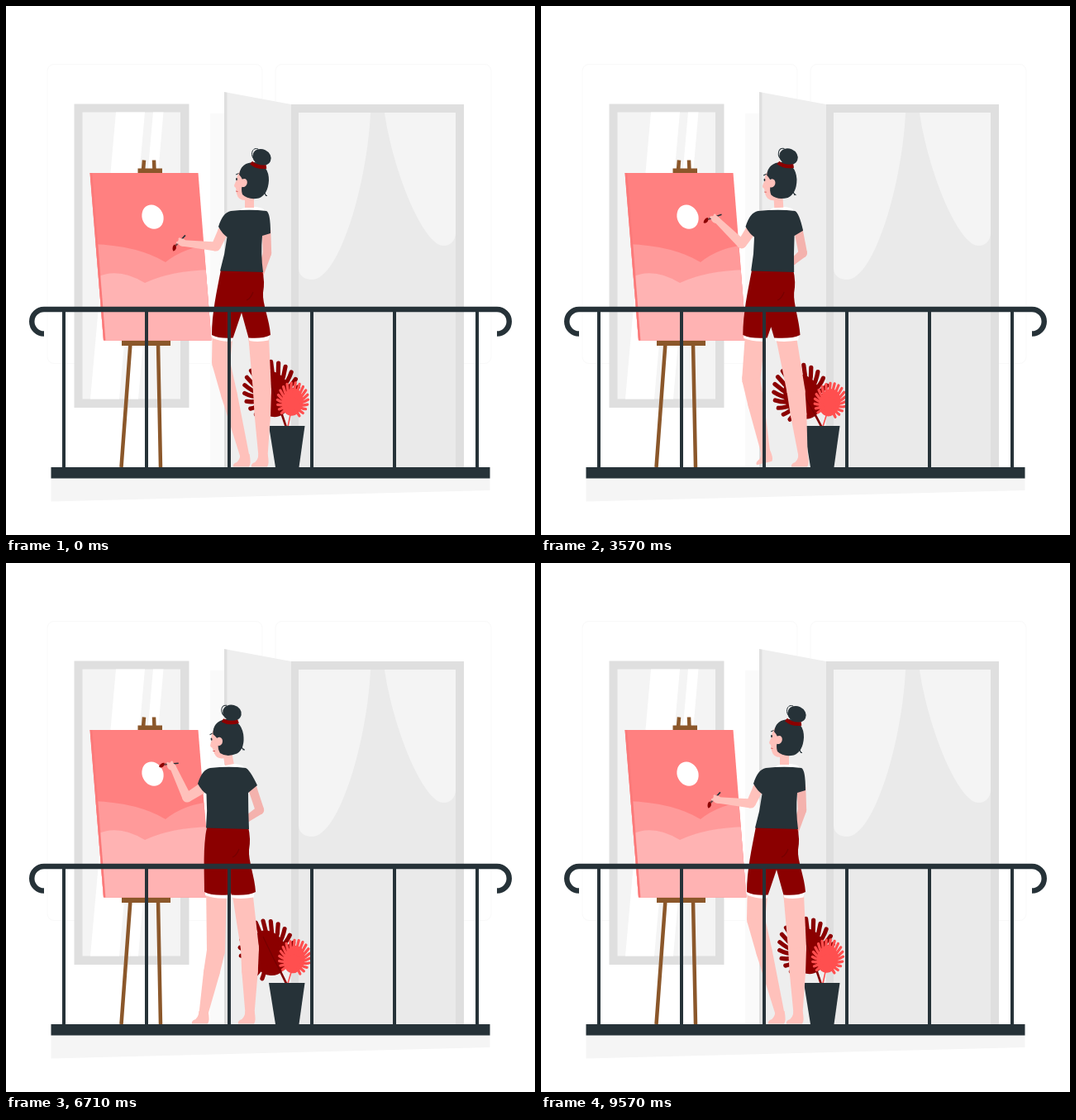
An HTML page with a canvas that plays this animation: 640 by 640 pixels, repeating every 9.64 s.

```html
<!DOCTYPE html>
<html lang="en">
<head>
<meta charset="utf-8">
<title>Painting on the balcony</title>
<style>
  html, body { margin: 0; width: 100%; height: 100%; overflow: hidden; background: #fff; }
  canvas { display: block; width: 640px; height: 640px; }
</style>
</head>
<body>
<canvas id="stage" width="640" height="640"></canvas>
<script>
const ctx = document.getElementById('stage').getContext('2d');
const LOOP = 9640, FPS = 14;
const INK = '#263238', RED = '#8b0000', CORAL = '#ff4f4f', SKIN = '#ffc1bb',
      SHADE = '#f4b2ad', WOOD = '#8b572a', FRAME = '#dfdfdf', PALE = '#f5f5f5';

// Which pose column is reached at which time.
const TIMES = [0, 1000, 2000, 2860, 4210, 5000, 6710, 8070, 9570];
const ORDER = [0, 1, 1, 2, 3, 4, 4, 5, 0];
const TRACKS = {
  neck:   [295, 293, 293.5, 280, 270.5, 283],
  tilt:   [0, -7, -6, -1, -11, -9],
  turn:   [1, 1, 1, 0, 0, 0],
  front:  [268, 268, 266, 250, 243, 255],
  back:   [310, 311, 311, 300, 293, 305],
  waist:  [285, 285, 285, 273.5, 268, 278],
  hemL:   [249, 245, 245, 243, 240, 248],
  hemR:   [320, 320, 320.5, 305.5, 302, 311],
  forkX:  [285, 283, 283, 273, 271, 280],
  forkY:  [371, 378, 378, 397, 396, 397],
  kneeL:  [260, 252, 252, 256, 254, 261],
  ankleL: [289, 319, 316, 236, 239, 242],
  lift:   [0, -45, -35, 0, 0, 0],
  kneeR:  [310, 308, 312, 303, 295, 305],
  ankleR: [311, 310, 315, 318, 295, 313],
  elbowX: [254, 247, 251, 231, 219, 237],
  elbowY: [291, 300, 289, 287, 284, 287],
  handX:  [213, 216, 211, 211, 200, 212],
  handY:  [286, 307, 275, 249, 246, 254],
  brush:  [-47, -74, -40, -8, -5, -4],
  wrist:  [324, 315, 309, 310, 310, 317]
};

const rad = deg => deg * Math.PI / 180;

// Monotone cubic interpolation: smooth, without overshoot.
function sample(track, t) {
  const v = i => track[ORDER[i]];
  const last = TIMES.length - 1;
  if (t >= TIMES[last]) return v(last);
  let i = 0;
  while (t >= TIMES[i + 1]) i++;
  const rate = k => (v(k + 1) - v(k)) / (TIMES[k + 1] - TIMES[k]);
  const slope = k => {
    if (k === 0 || k === last) return 0;
    const a = rate(k - 1), b = rate(k);
    return a * b <= 0 ? 0 : 2 * a * b / (a + b);
  };
  const h = TIMES[i + 1] - TIMES[i], u = (t - TIMES[i]) / h, w = 1 - u;
  return v(i) * (1 + 2 * u) * w * w + slope(i) * h * u * w * w
       + v(i + 1) * u * u * (3 - 2 * u) - slope(i + 1) * h * u * u * w;
}

function poseAt(t) {
  const p = {};
  for (const name in TRACKS) p[name] = sample(TRACKS[name], t);
  const u = Math.min(1, Math.max(0, (t - 4210) / 2500));
  p.handX += 3.5 * Math.sin(Math.PI * u);
  return p;
}

function shape(d, fill) {
  ctx.fillStyle = fill;
  ctx.fill(new Path2D(d));
}
function line(d, color, width, cap = 'butt') {
  ctx.strokeStyle = color;
  ctx.lineWidth = width;
  ctx.lineCap = cap;
  ctx.stroke(new Path2D(d));
}
function box(x, y, x2, y2, fill) {
  ctx.fillStyle = fill;
  ctx.fillRect(x, y, x2 - x, y2 - y);
}
function oval(x, y, rx, ry, angle, fill) {
  ctx.fillStyle = fill;
  ctx.beginPath();
  ctx.ellipse(x, y, rx, ry, rad(angle), 0, 2 * Math.PI);
  ctx.fill();
}
function placed(x, y, angle, draw) {
  ctx.save();
  ctx.translate(x, y);
  ctx.rotate(rad(angle));
  draw();
  ctx.restore();
}

// Chain of tapered round segments through [x, y, radius].
function limb(joints, fill) {
  joints.forEach(([x, y, r], i) => {
    oval(x, y, r, r, 0, fill);
    if (!i) return;
    const [px, py, pr] = joints[i - 1];
    const len = Math.hypot(x - px, y - py) || 1;
    const nx = (py - y) / len, ny = (x - px) / len;
    shape(`M${px + nx * pr},${py + ny * pr}L${x + nx * r},${y + ny * r}
      L${x - nx * r},${y - ny * r}L${px - nx * pr},${py - ny * pr}Z`, fill);
  });
}

function drawHouse() {
  box(0, 0, 640, 640, '#fff');
  ctx.strokeStyle = '#f9f9f9';
  ctx.lineWidth = 1;
  for (const [x, w] of [[50, 260], [326, 261]]) {
    ctx.beginPath();
    ctx.roundRect(x, 70.5, w, 362, 8);
    ctx.stroke();
  }
  box(82.5, 118.5, 221.5, 486, FRAME);
  box(92.5, 128.5, 211, 475.5, '#f4f4f4');
  shape('M133,128.5H168L137,475.5H102ZM178,128.5H190.5L160,475.5H147Z', '#fff');

  box(247, 130, 265, 558, '#fafafa');
  shape('M264,104L345,119V558H264Z', '#eee');
  shape('M264,104L267.5,104.7V558H264Z', FRAME);
  box(345, 119, 554, 558, FRAME);
  box(354, 129, 544, 558, '#eaeaea');
  shape('M354,129H441C437,215 403,331 370,331C360,331 355,326 354,318Z', '#f4f4f4');
  shape('M544,129H458C468,200 505,290 529,290C538,290 543,284 544,276Z', '#f4f4f4');
  shape('M54.5,571H585.5V586L54.5,599.5Z', PALE);
}

function drawEasel() {
  line('M150.5,408L139.5,558M184,408L187,558', WOOD, 4.5);
  box(140, 404.5, 199, 411, WOOD);
  line('M167,186.5L166,199M179,186.5L179.5,199', WOOD, 4.5);
  box(159.5, 196.5, 189, 202, WOOD);
  ctx.save();
  ctx.clip(new Path2D('M101.5,202H232.5L248.5,404.5H118Z'));
  box(100, 200, 250, 406, '#ff8080');
  shape('M105,288Q160,290 193,310Q217,291 250,289V410H105Z', '#ff9a9a');
  shape('M108,329Q135,315 168,335Q200,320 250,319V410H108Z', '#ffb3b3');
  shape('M101,202H104.5L120.5,405H117Z', '#fb7979');
  ctx.restore();
  oval(177.5, 255.2, 12.7, 15, -25, '#fff');
}

// Fingered leaf growing upwards from the origin.
function leaf(cx, cy, rx, ry, finger, fill) {
  oval(cx, cy + ry * .1, rx * .68, ry * .78, 0, fill);
  let d = '';
  for (let k = -9; k <= 9; k++) {
    const s = Math.sin(rad(k * 16)), c = Math.cos(rad(k * 16));
    d += `M${cx + rx * .5 * s},${cy - ry * (.4 * c - .16)}
      Q${cx + rx * .8 * s},${cy - ry * (.72 * c - .12)} ${cx + rx * s},${cy - ry * c}`;
  }
  line(d, fill, finger, 'round');
}

function drawPlant(sway) {
  placed(338, 506, -15.5 - 11 * sway, () => {
    line('M0,4L-1,-14', RED, 2.6);
    leaf(-5.5, -43, 32.5, 36, 5.2, RED);
    line('M0,-2Q-3,-30 -4,-60', '#760000', 1.2);
  });
  placed(341, 508, 9 + 6.5 * sway, () => {
    line('M0,3L1,-16', CORAL, 1.6);
    leaf(1, -31.5, 18.5, 21.5, 3.3, CORAL);
  });
  shape('M318,508H361.5L354.5,558H326Z', INK);
}

function drawFoot(x, y, angle) {
  placed(x, y, angle, () =>
    shape('M-5.5,-3Q-6,6 -12,8Q-15,10 -14,12.5H5Q8,9 5.5,-3Z', SKIN));
}

function drawLeg(hip, knee, ankle, angle) {
  const calf = [knee[0] + .35 * (ankle[0] - knee[0]), knee[1] + .35 * (ankle[1] - knee[1]), 9.8];
  limb([[...hip, 12.3], [...knee, 11], calf, [...ankle, 5.5]], SKIN);
  drawFoot(...ankle, angle);
}

function drawLower(p) {
  const gap = (399 - p.forkY) / 3;
  const inL = p.forkX - gap - 1, inR = p.forkX + gap * .8 + 1;
  const w = p.waist;
  drawLeg([(p.hemL + inL) / 2, 402], [p.kneeL, 469 - 38 * p.turn],
          [p.ankleL, 545 + .38 * p.lift], p.lift);
  drawLeg([(p.hemR + inR) / 2 - 1, 402], [p.kneeR, 466], [p.ankleR, 545], 0);
  shape(`M${p.hemL + .5},396L${inL},400L${inL - 1},405.5Q${p.hemL + 12},406.5 ${p.hemL + 1},402Z
    M${inR},400L${p.hemR - 1},397L${p.hemR - 2.5},404.5Q${inR + 12},407 ${inR + 1},405Z`, '#fff');
  shape(`M${w - 25},319C${w - 30},345 ${p.hemL},372 ${p.hemL},398
    Q${p.hemL + 10},403 ${inL},401.5L${p.forkX},${p.forkY}L${inR},401.5
    Q${p.hemR - 10},403 ${p.hemR},398C${p.hemR - 1},380 ${w + 25},360 ${w + 26},347
    Q${w + 28.5},334 ${w + 25},319Z`, RED);
  line(`M${w + 14},346Q${w + 11},354 ${w + 6},356`, '#760000', 1.2);
}

function drawShirt(p) {
  const { front: f, back: b, waist: w, turn } = p;
  const top = b - 3 + 8 * turn, cuffX = b + 11 - turn, cuffY = 269 + 6 * turn;
  oval(p.neck + 3, 247, 14, 4, 0, '#fff');
  shape(`M${f + 4},248Q${p.neck},245.5 ${top},248Q${top + 5},250 ${cuffX},${cuffY}
    L${b},278Q${b - 2 * turn},300 ${w + 26},322L${w - 26},320.5
    Q${(w - 26 + f) / 2 + 1.5},300 ${f - .5},279.5Q${f - 6},276 ${f - 11},267
    Q${f - 6},250 ${f + 4},248Z`, INK);
}

function drawHead(p) {
  placed(p.neck, 242, p.tilt, () => {
    shape('M-6,-14H5V2H-6Z', SKIN);
    shape('M-8,-46Q-16,-40 -16,-32L-19,-25Q-19,-23 -17,-22L-16,-15Q-14,-7 -6,-7L5,-10V-46Z', SKIN);
    shape(`M-13,-38Q-11,-53 6,-53Q23,-50 23,-31Q22,-14 11,-9.5Q-2,-7 -9,-14
      Q-11,-20 -9,-25L-9,-32Q-11,-36 -13,-38Z`, INK);
    oval(-7.5, -28, 4.2, 5.2, 20, SKIN);
    oval(14.5, -59, 11.5, 9.7, 25, INK);
    line('M1.5,-52.5Q9,-46 20,-47.5', RED, 4.6);
    line('M10,-69C2,-72 0,-60 6,-56M14,-19L21,-12M17,-19L19.5,-12', INK, 1);
    oval(-16, -32.5, .9, 1.7, 0, INK);
    line('M-17,-38L-13.5,-39.5', INK, 1);
    line('M-17,-18L-14.5,-17.5', '#d9605f', 1);
  });
}

function drawFrontArm(p) {
  placed(p.handX, p.handY, p.brush, () => {
    line('M-12,-3H9', INK, 1.6);
    line('M-10,-3H-6', '#7d4a4a', 2.2);
    shape('M-8,-5Q-12,-6 -15,-1Q-14,1 -11,0Q-8,-1 -8,-5Z', RED);
  });
  limb([[p.front - 5, 272, 6.5], [p.elbowX, p.elbowY, 5.6],
        [p.handX + 2, p.handY + 1, 3.8]], SKIN);
  oval(p.handX, p.handY, 5.3, 4.6, 35, SKIN);
  placed(p.handX, p.handY, p.brush, () => line('M0,0L-4,-4M1,0L1,-5', SKIN, 3, 'round'));
}

function drawWoman(p) {
  limb([[p.back + 5, 272, 5.3], [p.back + 14 - 8 * p.turn, 299, 5.2],
        [p.back - 2, p.wrist, 4]], SHADE);
  drawLower(p);
  drawFrontArm(p);
  drawShirt(p);
  drawHead(p);
}

function drawRailing() {
  box(54.5, 558, 585.5, 571.5, INK);
  let posts = '';
  for (let x = 70; x <= 570; x += 100) posts += `M${x},367V559`;
  line(posts, INK, 4);
  line('M46,396.5A14.75,14.75 0 0 1 46,367H594A14.75,14.75 0 0 1 594,396.5', INK, 6.5);
}

function render(now) {
  const ms = now % LOOP;
  const t = Math.floor((ms + 5) * FPS / 1000) * 1000 / FPS;
  drawHouse();
  drawEasel();
  drawPlant((1 - Math.cos(2 * Math.PI * t / LOOP)) / 2);
  drawWoman(poseAt(t));
  drawRailing();
}

const start = performance.now();
function tick() {
  render(performance.now() - start);
  requestAnimationFrame(tick);
}
tick();
</script>
</body>
</html>
```
